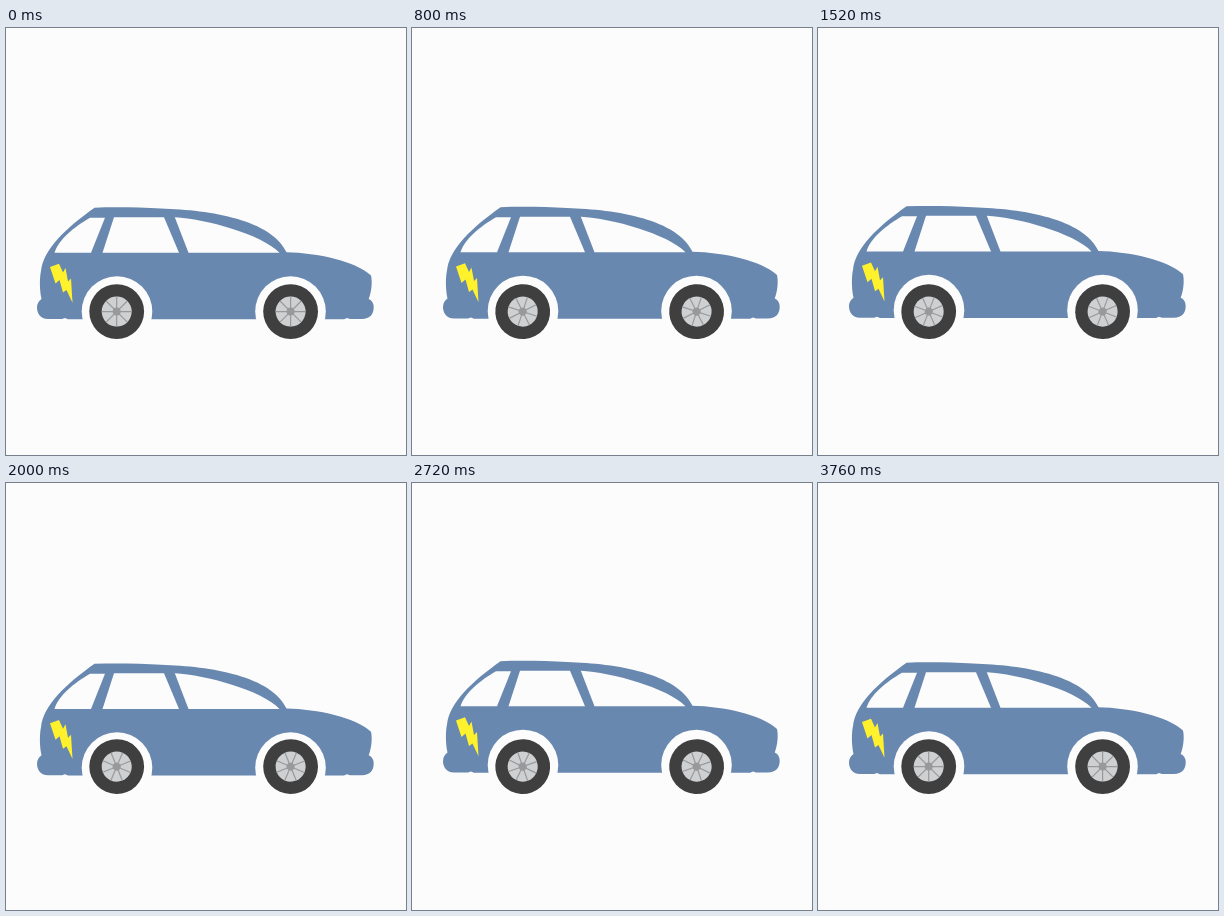
An HTML page for the animation above (3840 ms loop, 400 by 427 pixels).

```html
<!DOCTYPE html>
<html>
<head>
<meta charset="utf-8">
<style>
  html, body { margin: 0; width: 100%; height: 100%; overflow: hidden; background: #fcfcfc; }
  svg { display: block; width: 400px; height: 427px; }
</style>
</head>
<body>
<svg viewBox="0 0 400 427">
  <defs>
    <g id="wheel">
      <circle r="27.4" fill="#3f3f3f"/>
      <circle r="15" fill="#cfd0d2"/>
      <path d="M-15 0H15M0-15V15M-10.6-10.6L10.6 10.6M-10.6 10.6L10.6-10.6" stroke="#97999b" stroke-width="1.2"/>
      <circle r="4" fill="#97999b"/>
    </g>
  </defs>
  <g id="body">
    <path fill="#6988b0" d="M42 291C34 291 31 285 31 279.500Q31 274 35.500 271
      C33.500 262 33.500 250 35 243C37.500 221 60 200 88.500 179.700C110 179 135 179.500 155 180.500
      C205 182 266 192 280.500 224.300C312 225 349 233 365 247.500C366.500 254 365.500 264 362.700 271
      Q367.700 273 367.700 279.500C367.700 286 364 291 356 291H344L341 290L338 291.300H62L59 290L56 291Z"/>
    <g fill="#fcfcfc">
      <path d="M48.500 224.800C52 212 68 199 84 189.700H99L85 224.800Z"/>
      <path d="M108 189.200H158L173 224.800H96.500Z"/>
      <path d="M168.800 189.200C200 191 255 206 273.500 224.800H182.500Z"/>
      <circle cx="111" cy="283.500" r="35.300"/>
      <circle cx="284.500" cy="283.500" r="35.300"/>
    </g>
    <path fill="#fff22d" d="M44 239L53 235.800L57 244.500L59.500 240L62 253.500L65 250.500L66.500 274.800L60.500 262L57 264.500L53.500 252L49.500 255.500Z"/>
  </g>
  <g transform="translate(110.700 283.600)"><use class="spin" href="#wheel"/></g>
  <g transform="translate(284.600 283.600)"><use class="spin" href="#wheel"/></g>
</svg>
<script>
  const STEP = 80, LOOP = 3840, CYCLE = 3760;
  const TURNS = 2, BOBS = 12, LIFT = 1.7;
  const body = document.getElementById('body');
  const wheels = document.querySelectorAll('.spin');

  function draw(now) {
    const time = Math.floor((now % LOOP) / STEP) * STEP;
    const progress = time / CYCLE;
    const bob = LIFT * Math.sin(progress * BOBS * 2 * Math.PI);
    body.setAttribute('transform', `translate(0 ${bob})`);
    wheels.forEach(w => w.setAttribute('transform', `rotate(${progress * TURNS * 360})`));
  }

  let start;
  function tick(now) {
    start ??= now;
    draw(now - start);
    requestAnimationFrame(tick);
  }
  draw(0);
  requestAnimationFrame(tick);
</script>
</body>
</html>
```
